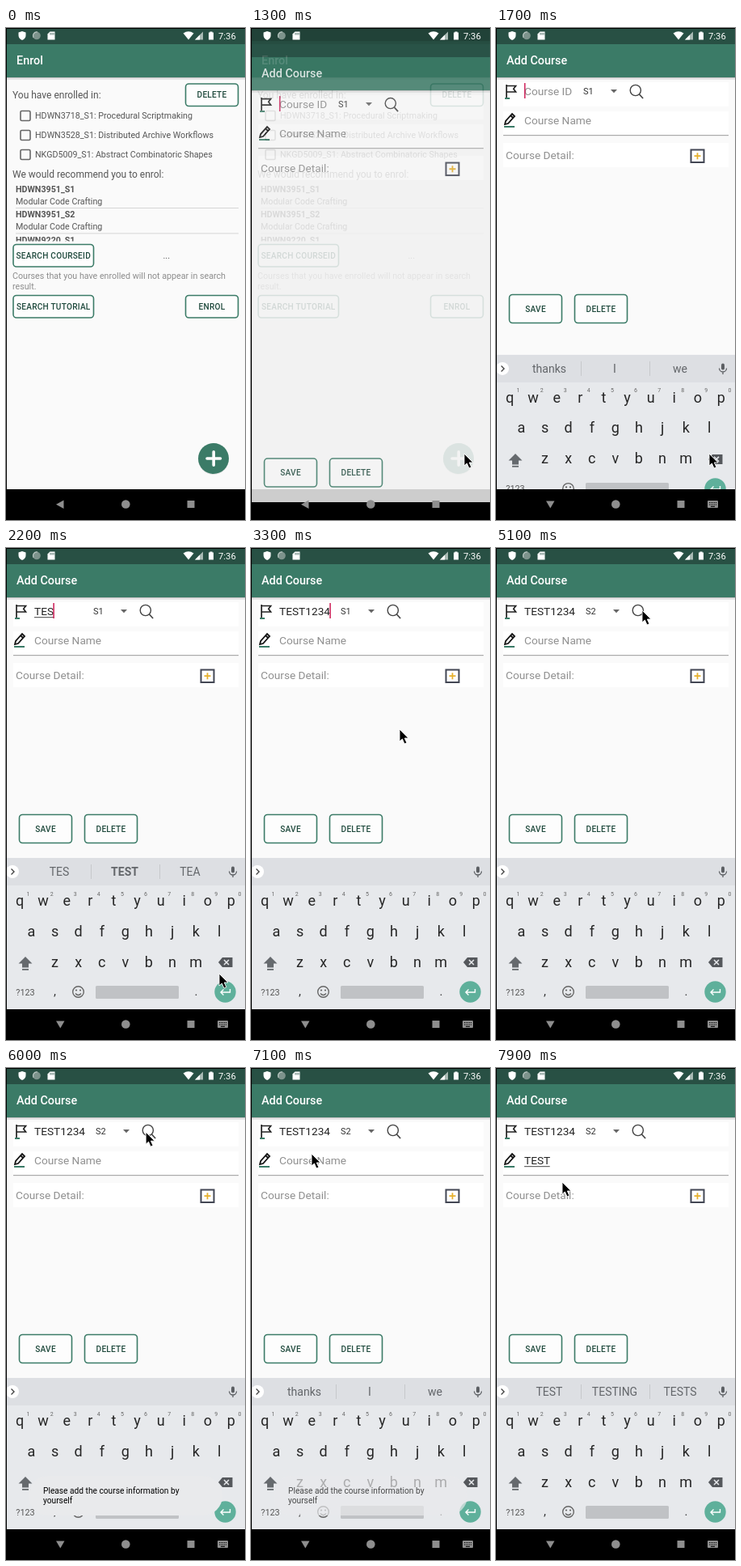
Recreate the animation shown at these times as an HTML page. Size 296 by 608 pixels, loop 8 s.

```html
<!DOCTYPE html>
<html lang="en">
<head>
<meta charset="utf-8">
<title>Course enrolment</title>
<style>
html, body { margin: 0; height: 100%; overflow: hidden; background: #000; }
svg { display: block; width: 100vw; height: 100vh; font-family: Roboto, sans-serif; }
</style>
</head>
<body>
<svg id="stage" viewBox="0 0 296 608"></svg>
<script>
const LOOP = 8000, STEP = 100;
const NAV_TOP = 570;
const GREEN = '#3b7b67', DARK = '#285044', INK = '#555';
const stage = document.getElementById('stage');

const text = (x, y, s, size, fill = INK, extra = '') =>
  `<text x="${x}" y="${y}" font-size="${size}" fill="${fill}" ${extra}>${s}</text>`;
const mid = (x, y, s, size, fill, extra = '') => text(x, y, s, size, fill, `text-anchor="middle" ${extra}`);
const rect = (x, y, w, h, fill, extra = '') =>
  `<rect x="${x}" y="${y}" width="${w}" height="${h}" fill="${fill}" ${extra}/>`;
const circle = (x, y, r, fill, extra = '') => `<circle cx="${x}" cy="${y}" r="${r}" fill="${fill}" ${extra}/>`;
const path = (d, fill, extra = '') => `<path d="${d}" fill="${fill}" ${extra}/>`;
const line = (d, color, width = 1, extra = '') => path(d, 'none', `stroke="${color}" stroke-width="${width}" ${extra}`);
const group = (content, attrs) => `<g ${attrs}>${content}</g>`;
const shift = (x, y, content) => group(content, `transform="translate(${x} ${y})"`);

const button = (x, y, w, h, label) =>
  rect(x, y, w, h, '#fdfdfd', `rx="4" stroke="${GREEN}" stroke-width="1.6"`) +
  mid(x + w / 2, y + h / 2 + 3.7, label, 10.1, '#1f4a3d', 'font-weight="500" letter-spacing=".25"');

const appWindow = (title, content) =>
  rect(0, 0, 296, 20, DARK) + rect(0, 61, 296, NAV_TOP - 61, '#fafafa') +
  rect(0, 61, 296, 1, '#000', 'opacity=".22"') + rect(0, 62, 296, 2, '#000', 'opacity=".08"') +
  rect(0, 20, 296, 41, GREEN) + rect(0, NAV_TOP, 296, 608 - NAV_TOP, '#000') +
  text(13, 45.3, title, 14.4, '#fff', 'font-weight="500"') + content;

function enrolPage(t) {
  const enrolled = [
    'HDWN3718_S1: Procedural Scriptmaking',
    'HDWN3528_S1: Distributed Archive Workflows',
    'NKGD5009_S1: Abstract Combinatoric Shapes'
  ].map((s, i) => rect(18, 102.5 + 24 * i, 12, 12, 'none', 'rx="1.5" stroke="#666" stroke-width="1.6"') +
    text(36, 112.3 + 24 * i, s, 10.7)).join('');
  const advised = ['HDWN3951_S1', 'HDWN3951_S2', 'HDWN9220_S1'].map((s, i) => shift(12, 31.4 * i,
    text(0, 203, s, 10.7, INK, 'font-weight="700"') + text(0, 218, 'Modular Code Crafting', 10.7) +
    rect(0, 222, 276, 1, '#d6d6d6'))).join('');
  const pressed = t >= 1100 && t < 1500;
  return appWindow('Enrol',
    text(8, 87, 'You have enrolled in:', 12) + button(222.5, 69, 65, 27.5, 'DELETE') + enrolled +
    text(8, 185, 'We would recommend you to enrol:', 12) + group(advised, 'clip-path="url(#list)"') +
    button(9, 267.5, 99.5, 27.5, 'SEARCH COURSEID') + text(194.5, 285, '...', 10.7) +
    text(8, 310, 'Courses that you have enrolled will not appear in search', 10.7, '#8c8c8c') +
    text(8, 323, 'result.', 10.7, '#8c8c8c') +
    button(9, 330.5, 99.5, 27.5, 'SEARCH TUTORIAL') + button(222.5, 330.5, 65, 27.5, 'ENROL') +
    circle(257, 533, 19, '#000', 'opacity=".1"') + circle(257, 532, 19, GREEN) +
    (pressed ? circle(257, 532, 19, '#fff', 'opacity=".2"') : '') +
    line('M249 532h16.500M257.200 523.800v16.500', '#fff', 3.6, 'stroke-linecap="round"'));
}

// Text of a field: each entry of times adds one letter.
const typed = (s, times, t) => s.slice(0, times.filter(k => t >= k).length);

function field(y, value, hint, caretOn) {
  const end = 35.5 + value.length * 7.8;
  return text(35, y + 5, value || hint, 13.7, value ? '#222' : '#909090') +
    (/^[A-Z]+$/.test(value) ? rect(35, y + 7.2, end - 35, 1, '#444') : '') +
    (caretOn ? rect(end - .6, y - 10, 1.6, 19, '#d0285f') : '');
}

const blink = (t, since) => (t - since) % 1000 < 500;

function coursePage(s) {
  const { t } = s, dx = s.course.length > 7 ? 3 : 0, by = t >= 1600 ? 329.5 : 516;
  const courseCaret = t < 4600 && (t < 2000 || blink(t, s.courseKey));
  return appWindow('Add Course',
    rect(9, 67, 279, 30, '#fff') + rect(9, 103, 279, 29, '#fff') + rect(9, 142, 279, 30, '#fff') +
    line('M13 70V86M13 71.5h11.500l-2.800 3.700 2.800 3.800H13', '#222', 1.7) + rect(11, 86, 6, 2, GREEN) +
    field(78, s.course, 'Course ID', courseCaret) +
    shift(dx, 0,
      text(108, 82, t >= 4700 ? 'S2' : 'S1', 11, '#333') + path('M142 76h8l-4 4.2z', '#666') +
      circle(172.8, 77, 6.6, 'none', 'stroke="#444" stroke-width="1.4"') + line('M177.5 82l4.6 5', '#444', 1.7)) +
    line('M11 119l1-4 8-9 3 3-8 9zM18 108l3 3', '#111', 1.8) + rect(10, 121, 13, 2, GREEN) +
    field(114, s.name, 'Course Name', t >= 6500 && blink(t, t < 7200 ? 6500 : 7400)) +
    rect(9, 132, 279, 1.2, '#aaa') +
    text(12, 162, 'Course Detail:', 13.7, '#909090') +
    rect(241.5, 150.5, 16, 15.5, '#fff', 'stroke="#434754" stroke-width="2"') +
    line('M245.5 158.2h8M249.5 154.2v8', '#e6b02c', 1.8) +
    button(16.5, by, 65, 35, 'SAVE') + button(97.5, by, 65, 35, 'DELETE'));
}

const WORDS = {
  '': ['thanks', 'I', 'we'], T: ['T', 'The', 'To'], TE: ['TE', 'The', 'Ten'],
  TES: ['TES', 'TEST', 'TEA'], TEST: ['TEST', 'TESTING', 'TESTS']
};

function keyboard(s) {
  const value = s.t >= 6500 ? s.name : s.course, words = WORDS[value];
  const row = (letters, x, y) => [...letters].map((c, i) => mid(x + 29.1 * i, y, c, 18, '#262626')).join('');
  const digits = [...'1234567890'].map((c, i) => mid(27.5 + 29.1 * i, 429.5, c, 7, '#666')).join('');
  const strip = words ? words.map((w, i) => mid(66 + 81 * i, 405, w, 14, '#63666a',
    value === 'TES' && i === 1 ? 'font-weight="700"' : '')).join('') +
    rect(105, 391, 1, 18, '#c6c8cb') + rect(190, 391, 1, 18, '#c6c8cb') : '';
  return rect(0, 383, 296, 188, '#e7e9ec') + rect(0, 383, 296, 34, '#dddfe3') + strip +
    circle(8, 400, 8, '#fff') + line('M6.5 396.5l3.5 3.5-3.5 3.5', '#444', 1.4) +
    rect(279, 393.5, 4, 8, '#5c5f63', 'rx="2"') + line('M276.5 399.5a4.5 4.5 0 0 0 9 0M281 404v3', '#5c5f63', 1.3) +
    row('qwertyuiop', 17, 442) + digits + row('asdfghjkl', 31.5, 479.5) + row('zxcvbnm', 60.5, 517.5) +
    path('M24 505l8.5 8.5h-4.5v5h-8v-5h-4.5z', '#666a6e') + rect(20, 520, 8, 1.8, '#666a6e') +
    path('M263 512l5-6h12.5v12H268z', '#55585c') + line('M270 509l6 6M276 509l-6 6', '#e7e9ec', 1.5) +
    mid(24, 552.5, '?123', 10.8, '#555') + mid(60.5, 553, ',', 15, '#333') + mid(235.5, 553, '.', 15, '#333') +
    circle(89.5, 548.5, 6.8, 'none', 'stroke="#666" stroke-width="1.4"') +
    circle(87, 546.5, 1.1, '#666') + circle(92, 546.5, 1.1, '#666') + line('M86 550.5q3.5 4 7 0', '#666', 1.3) +
    rect(111, 541, 103, 16, '#c0c2c5', 'rx="1.5"') +
    circle(271.5, 548.5, 13.2, '#5fb09b') + line('M277.5 545v4h-11M269.5 545.500l-3.500 3.500 3.500 3.500', '#fff', 1.4);
}

const dropdown = t => group(
  rect(100, 64, 70, 72, '#000', 'opacity=".16" rx="2"') + rect(99, 62, 70, 71, '#fff', 'rx="1.5"') +
  (t >= 4500 ? rect(99, 97, 70, 36, '#e2e2e2') : '') +
  text(111, 84, 'S1', 11, '#333') + text(111, 119, 'S2', 11, '#333'), `opacity="${t < 4100 ? .6 : 1}"`);

const toast = alpha => group(
  rect(28, 504, 240, 49, '#e9eaec', 'rx="24"') +
  text(46, 525.5, 'Please add the course information by', 10.2, '#000') +
  text(46, 538, 'yourself', 10.2, '#000'), `opacity="${alpha}"`);

const statusBar =
  path('M20 4l4.5 1.6v3.4q0 4-4.5 6-4.5-2-4.5-6V5.6z', '#fff') +
  circle(38, 9.5, 4.8, '#7d938c') + line('M34 12a4.8 4.8 0 0 1 5-7', '#b8c6c1', 1.2) +
  path('M54.5 4.5h6v10h-9v-7z', '#fff') + line('M55 6v2.5M57 6v2.5M59 6v2.5', DARK, .8) +
  path('M219.5 6.5q6.5-4.5 13 0l-6.5 8z', '#fff') +
  path('M244 4.5v10h-10z', '#a9bab4') + path('M240 8.5v6h-6z', '#fff') +
  path('M251 5.5h1.5v-1h3v1h1.5v9h-6z', '#fff') + text(263, 13.5, '7:36', 11.3, '#fff');

const navButtons = keysShown =>
  path(keysShown ? 'M62 584.5h10.5l-5.2 9z' : 'M71.5 583.5v10.5l-9.5-5.2z', '#8e8e8e') +
  circle(148.3, 588.5, 5.3, '#8e8e8e') + rect(224.5, 584, 9, 9, '#8e8e8e') +
  (keysShown ? rect(262, 584, 13, 9, '#8e8e8e', 'rx="1"') +
    line('M264 586.5h9M264 589h9', '#000', 1, 'stroke-dasharray="1 1"') + line('M266 591.3h5', '#000') : '');

// Pointer positions: time, x, y.
const ROUTE = [[0, 300, 400], [900, 262, 528], [1100, 264, 526], [2700, 264, 526], [3300, 184, 224],
  [3500, 184, 224], [3900, 147, 79], [4000, 147, 79], [4400, 125, 113], [4700, 125, 113], [5000, 181, 77],
  [5900, 181, 77], [6500, 75, 106], [7300, 75, 106], [7700, 82, 141], [8000, 82, 141]];

function pointer(t) {
  const i = ROUTE.findIndex(p => p[0] > t), a = ROUTE[i - 1], b = ROUTE[i];
  const u = (t - a[0]) / (b[0] - a[0]), k = u * u * (3 - 2 * u);
  return shift(a[1] + (b[1] - a[1]) * k, a[2] + (b[2] - a[2]) * k,
    path('M0 0v15l3.4-3 2.6 6 2.9-1.3-2.6-5.7h4.7z', '#000', 'stroke="#fff" stroke-width=".9"'));
}

const COURSE_KEYS = [2000, 2100, 2200, 2300, 2600, 2700, 2800, 2900];
const NAME_KEYS = [7200, 7300, 7300, 7400];
const ramp = (t, from, length) => Math.min(1, Math.max(0, (t - from) / length));

function draw(t) {
  const s = {
    t, course: typed('TEST1234', COURSE_KEYS, t), name: typed('TEST', NAME_KEYS, t),
    courseKey: COURSE_KEYS.filter(k => k <= t).pop()
  };
  const enter = ramp(t, 1230, 350), alpha = 1 - (1 - ramp(t, 1230, 200)) ** 4;
  const keys = 1 - (1 - ramp(t, 1500, 300)) ** 2;
  const toastAlpha = Math.min(ramp(t, 5400, 300), 1 - ramp(t, 7000, 320));
  let out = `<clipPath id="list"><rect x="9" y="190" width="279" height="73.5"/></clipPath>
    <clipPath id="screen"><rect width="296" height="${NAV_TOP}"/></clipPath>`;
  // The old page dims while the new one fades in over it.
  if (alpha < 1) out += group(enrolPage(t), `opacity="${1 - .2 * alpha}"`);
  if (alpha > 0) out += group(coursePage(s), `opacity="${alpha}" transform="translate(0 ${49 * (1 - enter) ** 5})"`);
  if (keys > 0) out += group(shift(0, 188 * (1 - keys), keyboard(s)), 'clip-path="url(#screen)"');
  if (t >= 4000 && t < 4700) out += dropdown(t);
  if (toastAlpha > 0) out += toast(toastAlpha);
  out += statusBar + navButtons(keys > 0) + rect(0, 0, 1, 608, '#000') + rect(0, 0, 296, 1, '#000');
  stage.innerHTML = out + pointer(t);
}

let shown = -1;
const start = performance.now();
function tick() {
  const t = Math.floor((performance.now() - start) % LOOP / STEP) * STEP;
  if (t !== shown) draw(shown = t);
  requestAnimationFrame(tick);
}
tick();
</script>
</body>
</html>
```
